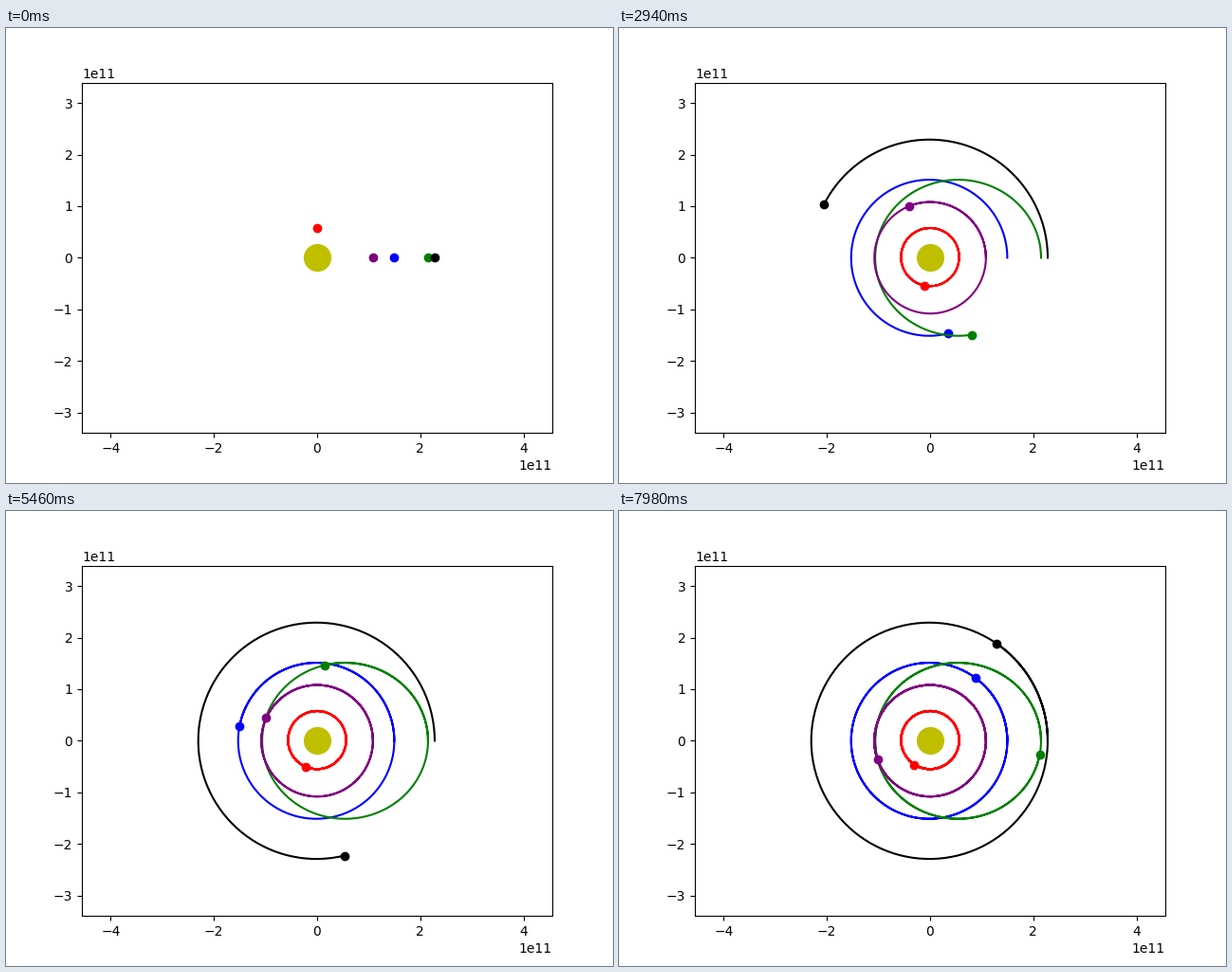
A matplotlib script for the animation above (8 s loop, 640 px wide and 480 px high).

```python
import numpy as np
import matplotlib.pyplot as plt
from matplotlib.animation import FuncAnimation

GM = 1.3271e20          # solar gravitational parameter, m^3/s^2
DAY = 86400.0
STEP = 3 * DAY          # simulated time per frame
SUBSTEPS = 24
FRAMES = 267
LOOP_MS = 8000

# colour, start position (m), start velocity (m/s)
BODIES = [
    ("blue", (149.6e9, 0), (0, 29951)),
    ("green", (215e9, 0), (0, 20220)),
    ("red", (0, 57.9e9), (-47280, 0)),
    ("purple", (108.2e9, 0), (0, 35010)),
    ("black", (227.9e9, 0), (0, 24195)),
]


def gravity(pos):
    dist = np.linalg.norm(pos, axis=1, keepdims=True)
    return -GM * pos / dist**3


def simulate():
    """Positions of all bodies, shape (frames, bodies, 2)."""
    pos = np.array([b[1] for b in BODIES], float)
    vel = np.array([b[2] for b in BODIES], float)
    dt = STEP / SUBSTEPS
    path = [pos.copy()]
    for _ in range(FRAMES - 1):
        for _ in range(SUBSTEPS):
            vel += gravity(pos) * dt / 2
            pos += vel * dt
            vel += gravity(pos) * dt / 2
        path.append(pos.copy())
    return np.array(path)


path = simulate()

fig, ax = plt.subplots(figsize=(6.4, 4.8), dpi=100)
half = 2 * 227.9e9
ax.set_xlim(-half, half)
ax.set_ylim(-half * 369.6 / 496, half * 369.6 / 496)

ax.plot(0, 0, "o", color="y", markersize=20)
trails, dots = [], []
for color, start, _ in BODIES:
    trails.append(ax.plot([], [], color=color)[0])
    dots.append(ax.plot(*start, "o", color=color)[0])


def update(frame):
    for i, (trail, dot) in enumerate(zip(trails, dots)):
        x, y = path[:frame + 1, i].T
        trail.set_data(x, y)
        dot.set_data(x[-1:], y[-1:])
    return trails + dots


anim = FuncAnimation(fig, update, frames=FRAMES, init_func=lambda: update(0),
                     interval=LOOP_MS / FRAMES, repeat=True, repeat_delay=0)
plt.show()
```
